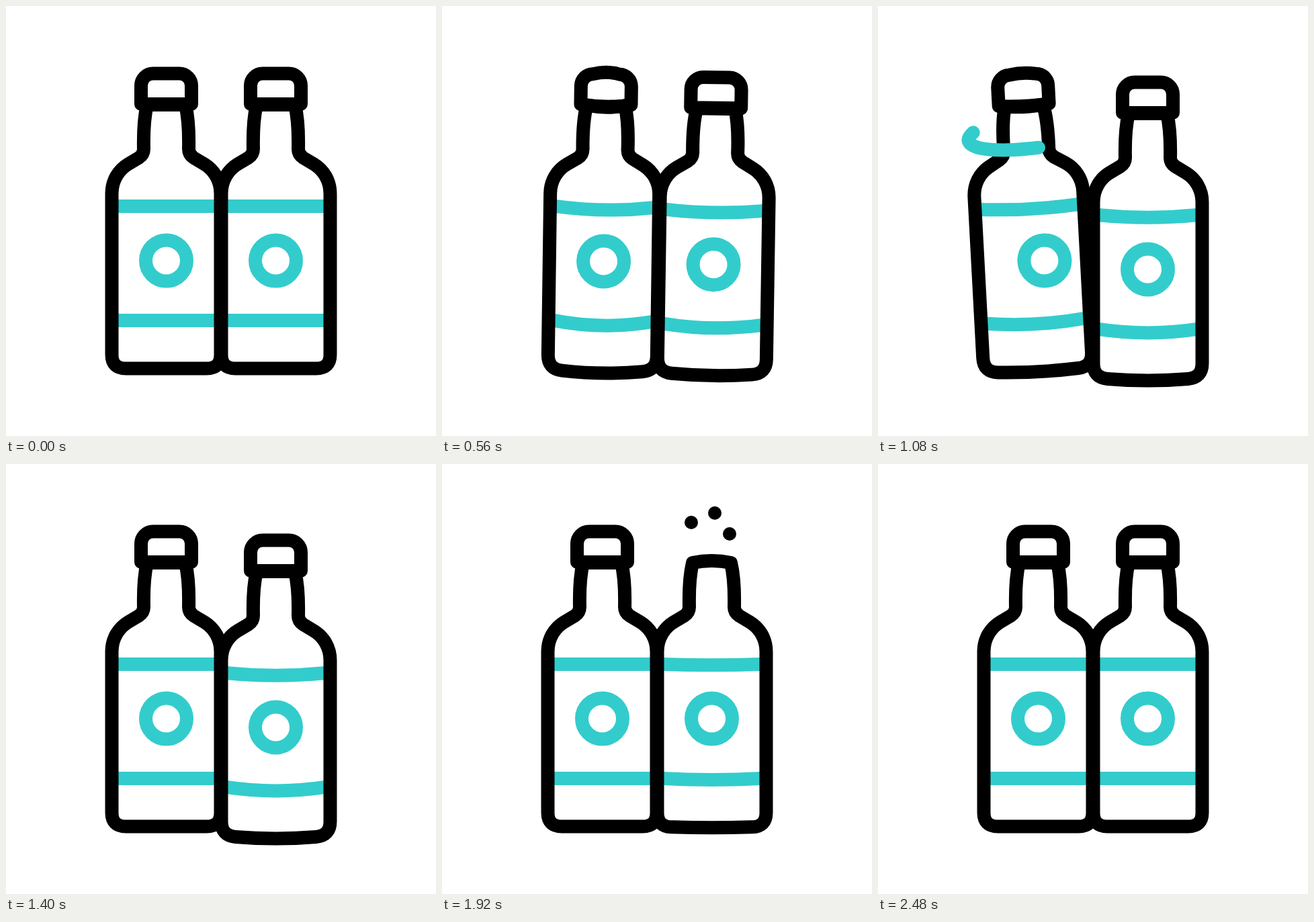
An HTML page for the animation above (2.64 s loop, 640 by 640 pixels).

```html
<!DOCTYPE html>
<html lang="en">
<head>
<meta charset="utf-8">
<title>Two bottles</title>
<style>
  html, body { margin: 0; width: 100%; height: 100%; overflow: hidden; background: #fff; }
  svg { display: block; width: 100vw; height: 100vh; }
  .line { fill: none; stroke: #000; stroke-width: 20; stroke-linejoin: round; }
  .teal { fill: none; stroke: #3cc; stroke-width: 20; }
  #ribbon { stroke-linecap: round; }
</style>
</head>
<body>
<svg viewBox="0 0 640 640">
  <defs>
    <clipPath id="inside"><rect x="-81" y="280" width="162" height="230"/></clipPath>
  </defs>
  <g id="left"></g>
  <g id="right"></g>
  <g id="dots"></g>
</svg>
<script>
const LOOP = 2640, STEP = 40, RIBBON = 213;
const $ = id => document.getElementById(id);

const ramp = (t, a, b) => Math.min(1, Math.max(0, (t - a) / (b - a)));
const ease = (t, a, b) => (1 - Math.cos(Math.PI * ramp(t, a, b))) / 2;
const pulse = (t, a, peak, b) => ease(t, a, peak) - ease(t, peak, b);

function set(el, attrs) {
  for (const k in attrs) el.setAttribute(k, attrs[k]);
  return el;
}

function add(parent, tag, attrs = {}) {
  const el = document.createElementNS("http://www.w3.org/2000/svg", tag);
  return parent.appendChild(set(el, attrs));
}

function makeBottle(id, x) {
  const root = $(id);
  const top = add(root, "path", { class: "teal" });
  const bottom = add(root, "path", { class: "teal" });
  const label = add(root, "g", { "clip-path": "url(#inside)" });
  return {
    root, x, top, bottom,
    ring: add(label, "circle", { class: "teal", cy: 379, r: 30.5 }),
    body: add(root, "path", { class: "line" }),
    cap: add(root, "path", { class: "line" })
  };
}

const band = (y, bow) => ({ d: `M-74 ${y}Q0 ${y + 2 * bow} 74 ${y}` });

function poseBottle(b, { tilt, y, bow, capBow = 0, spin = 0, lift = 0, turn = 0, size = 1 }) {
  set(b.root, { transform: `translate(${b.x} ${y}) rotate(${tilt} 0 545)` });
  set(b.top, band(298, .75 * bow));
  set(b.bottom, band(468, 1.1 * bow));
  set(b.ring, { cx: spin < -150 ? spin + 300 : spin });

  const base = 539.5, corner = base + .15 * bow, edge = base + .5 * bow;
  const mouth = 147 + 2 * capBow - 6 * Math.min(1, -lift / 30);
  set(b.body, {
    d: `M-28.5 147C-33 166 -34 190 -33.5 213Q-33.5 221 -41 226L-57 235.5
        C-71 244 -81 260 -81 279V519Q-81 ${corner} -60 ${edge}Q0 ${base + 1.5 * bow} 60 ${edge}
        Q81 ${corner} 81 519V279C81 260 71 244 57 235.5L41 226Q33.5 221 33.5 213
        C34 190 33 166 28.5 147Q0 ${mouth} -28.5 147Z`
  });
  set(b.cap, {
    d: `M-37.5 146V118.5A18 18 0 0 1 -19.5 100.5Q0 ${100.5 - 2 * capBow} 19.5 100.5
        A18 18 0 0 1 37.5 118.5V146Q0 ${146 + 2 * capBow} -37.5 146Z`,
    transform: `translate(0 ${lift + 123}) rotate(${turn}) scale(${size}) translate(0 -123)`
  });
}

const left = makeBottle("left", 238.5);
const right = makeBottle("right", 401.5);
const ribbon = add(left.root, "path", {
  id: "ribbon", class: "teal", pathLength: RIBBON,
  d: "M77 179.5Q100 191 84 200Q68 207 46.5 209Q0 212 -18.5 212Q-83 211 -85.5 194Q-85 189 -77.5 183"
});
const dots = [[-30.5, -53], [4.5, -67], [26.5, -36]].map(([x, y]) => ({ x, y, el: add($("dots"), "circle") }));

function drawLeft(t) {
  const bow = 9 * pulse(t, 240, 760, 1370);
  poseBottle(left, {
    tilt: 1.1 * pulse(t, 0, 440, 1120) - 3.1 * pulse(t, 440, 1120, 1360),
    y: .15 * bow, bow, capBow: .45 * bow,
    spin: -300 * ease(t, 550, 1180)
  });

  const head = RIBBON * ramp(t, 645, 1040), tail = RIBBON * ramp(t, 905, 1305);
  set(ribbon, {
    visibility: head - tail > .5 ? "visible" : "hidden",
    "stroke-dasharray": `${head - tail} 999`,
    "stroke-dashoffset": -tail
  });
}

function drawRight(t) {
  const wave = 1.2 + 14.5 * Math.cos(2 * Math.PI * (t - 240) / 400);
  poseBottle(right, {
    tilt: 1.25 * pulse(t, 0, 440, 840) - .5 * pulse(t, 440, 840, 1060),
    y: wave * (ease(t, 0, 240) - ease(t, 1640, 1840)),
    bow: 5 * (ease(t, 0, 240) - ease(t, 1560, 2160)),
    lift: -195 * pulse(t, 1560, 1800, 2240),
    turn: -8 * pulse(t, 1560, 1840, 2240),
    size: 1 + .025 * pulse(t, 2240, 2360, 2480)
  });

  const spread = ease(t, 1640, 1920) + .15 * ease(t, 1920, 2160);
  const r = 10 * (ease(t, 1640, 1760) - ease(t, 1960, 2160));
  for (const d of dots) set(d.el, { cx: 401.5 + d.x * spread, cy: 140 + d.y * spread, r });
}

const start = performance.now();
function tick() {
  const now = (performance.now() - start) % LOOP;
  const t = Math.floor(now / STEP) * STEP;
  drawLeft(t);
  drawRight(t);
  requestAnimationFrame(tick);
}
tick();
</script>
</body>
</html>
```
